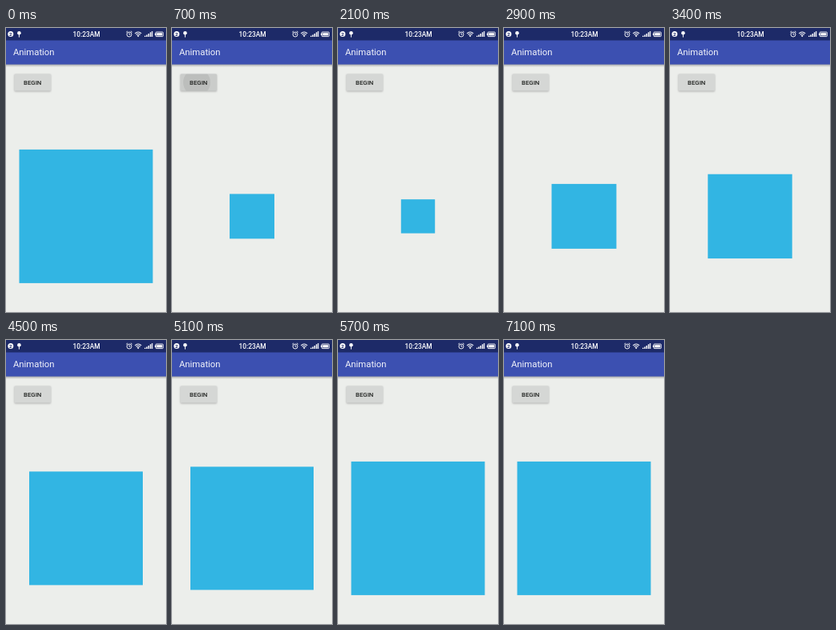
An HTML page that plays this animation: 200 by 355 pixels, repeating every 7.2 s.

```html
<!DOCTYPE html>
<html lang="en">
<head>
<meta charset="utf-8">
<title>Animation</title>
<style>
  html, body { margin: 0; height: 100%; overflow: hidden; background: #eceeeb; }
  svg { display: block; width: 100vw; height: 100vh; }
  text { font-family: Roboto, sans-serif; }
</style>
</head>
<body>
<svg viewBox="0 0 200 355">
  <defs>
    <linearGradient id="shade" x2="0" y2="1">
      <stop stop-color="#777b85" stop-opacity=".75"/>
      <stop offset="1" stop-color="#999" stop-opacity="0"/>
    </linearGradient>
    <filter id="soft"><feGaussianBlur stdDeviation=".8"/></filter>
    <clipPath id="face"><rect x="10.5" y="57.5" width="45.5" height="21" rx="1"/></clipPath>
  </defs>
  <rect width="200" height="355" fill="#eceeeb"/>

  <!-- App bar and status bar -->
  <rect y="45" width="200" height="4" fill="url(#shade)"/>
  <rect y="15" width="200" height="30.5" fill="#3c50b1"/>
  <rect width="200" height="15.5" fill="#1d2a68"/>
  <text x="9" y="34.2" font-size="11.3" fill="#f4f5fb">Animation</text>
  <text x="83.5" y="10.8" font-size="8.4" font-weight="500" fill="#fff">10:23AM</text>
  <circle cx="5.8" cy="7.5" r="3.5" fill="#fff"/>
  <text x="5.8" y="9.6" font-size="6" font-weight="700" text-anchor="middle" fill="#1d2a68">2</text>
  <g fill="#fff">
    <circle cx="16.4" cy="6.3" r="2.3"/>
    <rect x="15.9" y="8" width="1" height="3.6"/>
    <path d="M165.2 11.2l-1.5-1.8q1.5-1.2 3 0z"/>
    <path d="M173 11h1.5v-1.2H173zM175.3 11h1.5V8.5h-1.5zM177.6 11h1.5V7h-1.5zM179.9 11h1.5V5.3h-1.5zM182.1 11h1.2V4h-1.2z"/>
    <rect x="188.3" y="6.2" width="7" height="3.2"/>
    <rect x="186" y="6.6" width="1" height="2.4"/>
  </g>
  <g fill="none" stroke="#fff" stroke-width=".9">
    <circle cx="154" cy="8" r="3"/>
    <path d="M154 6.2v2h1.3M150.3 5.3l1.8-1.5M157.7 5.3l-1.8-1.5"/>
    <path d="M161.2 6.8q4-3.6 8 0M162.6 8.4q2.6-2.2 5.2 0" stroke-width="1.1"/>
    <rect x="187.3" y="5" width="9" height="5.6" rx=".6"/>
  </g>

  <!-- Button -->
  <rect x="10.5" y="58.2" width="45.5" height="21.3" rx="1" fill="#999" opacity=".7" filter="url(#soft)"/>
  <rect x="10.5" y="57.5" width="45.5" height="21" rx="1" fill="#d5d7d5"/>
  <g id="press" clip-path="url(#face)" opacity="0">
    <rect x="10" y="57" width="47" height="22" opacity=".05"/>
    <circle id="ripple" cx="31" cy="68" opacity=".07"/>
  </g>
  <text x="22" y="70.8" font-size="7.8" font-weight="500" fill="#202220">BEGIN</text>

  <rect id="box" fill="#32b5e3"/>
</svg>
<script>
  const LOOP = 7200, STEP = 100, FULL = 167, CX = 100, CY = 235.4;
  const keys = [[0, 1], [150, 1], [700, .335], [1450, .17], [2100, .254],
                [2900, .485], [4000, .778], [5100, .922], [5700, 1], [LOOP, 1]];
  const $ = id => document.getElementById(id);
  const set = (el, attrs) => { for (const k in attrs) el.setAttribute(k, attrs[k]); };
  const clamp = x => Math.min(1, Math.max(0, x));
  const slope = i => keys[i + 1] ? (keys[i + 1][1] - keys[i][1]) / (keys[i + 1][0] - keys[i][0]) : 0;

  // Harmonic mean of the neighbouring slopes: smooth, without overshoot
  function tangent(i) {
    const a = i ? slope(i - 1) : 0, b = slope(i);
    return a * b > 0 ? 2 * a * b / (a + b) : 0;
  }

  function scaleAt(t) {
    const i = keys.findIndex((k, n) => t < keys[n + 1][0]);
    const [t0, a] = keys[i], [t1, b] = keys[i + 1];
    const d = t1 - t0, u = (t - t0) / d, v = 1 - u;
    return a * v * v * (1 + 2 * u) + b * u * u * (3 - 2 * u)
      + d * u * v * (tangent(i) * v - tangent(i + 1) * u);
  }

  function draw(now) {
    const t = Math.floor(now % LOOP / STEP) * STEP;
    const size = FULL * scaleAt(t);
    set($('box'), { x: CX - size / 2, y: CY - size / 2, width: size, height: size });
    set($('press'), { opacity: clamp((t - 100) / 200) * clamp((1100 - t) / 400) });
    set($('ripple'), { r: 17 * clamp((t - 100) / 600) + 8 * clamp((t - 700) / 400) });
    requestAnimationFrame(draw);
  }
  const start = performance.now();
  const tick = () => draw(performance.now() - start);
  requestAnimationFrame = (raf => fn => raf.call(window, tick))(window.requestAnimationFrame);
  tick();
</script>
</body>
</html>
```
